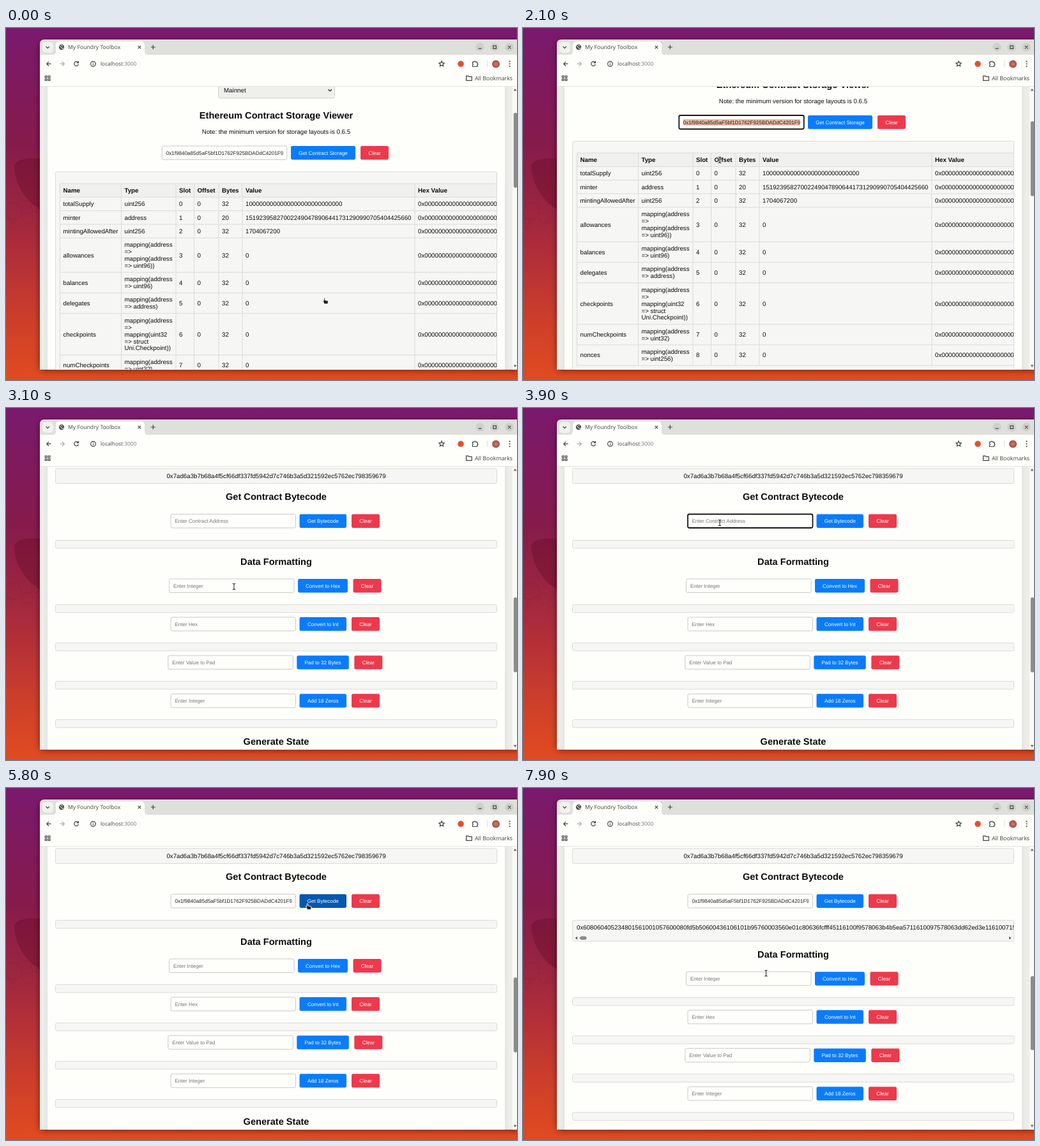
An HTML page that plays this animation: 800x552 px, repeating every 8000 ms.

```html
<!DOCTYPE html>
<html lang="en">
<head>
<meta charset="utf-8">
<title>Contract toolbox</title>
<style>
  html, body { margin: 0; width: 100%; height: 100%; overflow: hidden; background: #841a4f; }
  #stage { display: block; width: 800px; height: 552px; }
  text { font-family: "Liberation Sans", Arial, sans-serif; font-size: 9.73px; fill: #0c0c0c; text-rendering: geometricPrecision; white-space: pre; }
  .title, .head { font-weight: bold; }
  .title { font-size: 14.58px; text-anchor: middle; }
  .mid { text-anchor: middle; }
  .field { font-size: 8.11px; fill: #202020; }
  .hint { fill: #777; }
  .btn { font-size: 8.11px; fill: #fff; text-anchor: middle; }
  .ui { font-family: "Open Sans", "Noto Sans", sans-serif; fill: #40403e; }
  .icon { fill: none; stroke: #444442; stroke-width: 1.2; }
</style>
</head>
<body>
<svg id="stage" viewBox="0 0 800 552" xmlns="http://www.w3.org/2000/svg"></svg>
<script>
const LOOP = 8000, STEP = 100;
const BLUE = '#0a7cfa', BLUE_HOVER = '#0657ae', RED = '#ec3a4c', WHITE = '#fefefb', EDGE = '#dbdbd8';
const ADDRESS = '0x1f9840a85d5aF5bf1D1762F925BDADdC4201F984';
const BYTECODE = '0x608060405234801561001057600080fd5b50600436106101b95760003560e01c80636fcfff45116100f9578063b4b5ea5711610097578063dd62ed3e1161007157';
const LOWER = 599;      // top of the lower sections inside the page
const LINE = 10.944;

const rect = (x, y, w, h, fill, r = 0, more = '') =>
  `<rect x="${x}" y="${y}" width="${w}" height="${h}" fill="${fill}" rx="${r}" ${more}/>`;
const text = (x, y, s, cls = '', more = '') => `<text x="${x}" y="${y}" class="${cls}" ${more}>${s}</text>`;
const path = (d, more = 'class="icon"') => `<path d="${d}" ${more}/>`;
const circle = (x, y, r, more) => `<circle cx="${x}" cy="${y}" r="${r}" ${more}/>`;
const crop = (x, y, w, h, body) =>
  `<svg x="${x}" y="${y}" width="${w}" height="${h}" viewBox="${x} ${y} ${w} ${h}">${body}</svg>`;
const button = (x, y, w, label, fill, id = '') =>
  rect(x, y, w, 21.5, fill, 2.4, id && `id="${id}"`) + text(x + w / 2, y + 13.6, label, 'btn');
const panel = (y, h, id = '') =>
  rect(77.5, y, 691, h, '#f6f6f4', 2.4, `stroke="${EDGE}" ${id && `id="${id}"`}`);

function input(x, y, value, id = '', cls = 'field hint') {
  const tag = name => id && `id="${id}${name}"`;
  return rect(x, y, 195.5, 21.5, WHITE, 2.4, `stroke="#cacac7" ${tag('Box')}`) +
    crop(x + 6, y + 1, 183.5, 19.5,
      rect(x + 6.5, y + 6, 184, 10, '#e9b9a8', 0, `visibility="hidden" ${tag('Mark')}`) +
      text(x + 6.4, y + 13.6, value, cls, tag('Text')));
}

function form(x, y, hint, width, label, clearX, id = '') {
  return input(x, y, hint, id) + button(x + 201.5, y, width, label, BLUE, id && id + 'Btn') +
    button(clearX, y, 44, 'Clear', RED);
}

const scroller = y =>
  path(`M85 ${y - 2.5}v5l-3.5-2.5zM761 ${y - 2.5}v5l3.5-2.5z`, 'fill="#5c5c5a"') +
  rect(89, y - 2.8, 10.5, 5.6, '#8c8c8a', 2.8);

function table() {
  const cols = [84.5, 180.5, 266, 294.5, 333, 370, 640];
  const zeros = '0x' + '0'.repeat(64);
  const rows = [
    ['totalSupply', 'uint256', 32, '1000000000000000000000000000'],
    ['minter', 'address', 20, '151923958270022490478906441731290990705404425660'],
    ['mintingAllowedAfter', 'uint256', 32, '1704067200'],
    ['allowances', 'mapping(address|=>|mapping(address|=> uint96))', 32, 0],
    ['balances', 'mapping(address|=> uint96)', 32, 0],
    ['delegates', 'mapping(address|=> address)', 32, 0],
    ['checkpoints', 'mapping(address|=>|mapping(uint32|=> struct|Uni.Checkpoint))', 32, 0],
    ['numCheckpoints', 'mapping(address|=> uint32)', 32, 0],
    ['nonces', 'mapping(address|=> uint256)', 32, 0],
  ].map(([name, type, bytes, value], slot) => [name, type, slot, 0, bytes, value, zeros]);
  rows.unshift(['Name', 'Type', 'Slot', 'Offset', 'Bytes', 'Value', 'Hex Value']);

  let y = 244, out = rect(84, y, 690, 21.3, '#f0f0ee'), lines = '';
  rows.forEach((row, r) => {
    const height = LINE * row[1].split('|').length + 10.336, middle = y + height / 2 + 3.4;
    lines += `M84 ${y}H775`;
    row.forEach((cell, c) => {
      const parts = String(cell).replaceAll('>', '&gt;').split('|');
      parts.forEach((part, i) => {
        out += text(cols[c] + 5, middle + (i - (parts.length - 1) / 2) * LINE, part, r ? '' : 'head');
      });
    });
    y += height;
  });
  cols.forEach(x => lines += `M${x} 244V${y}`);
  return crop(78, 226, 690, 380, out + path(lines + `M84 ${y}H775`, `fill="none" stroke="${EDGE}"`)) + scroller(598);
}

function page() {
  const upper =
    rect(332.5, 85.5, 182, 24.5, '#efefec', 2.4, 'stroke="#cfcfcc"') +
    text(341, 101.3, 'Mainnet') +
    path('M504.5 96.2l2.7 2.7 2.7-2.7', 'fill="none" stroke="#222" stroke-width="1.3"') +
    text(423, 142, 'Ethereum Contract Storage Viewer', 'title') +
    text(423, 166.2, 'Note: the minimum version for storage layouts is 0.6.5', 'mid') +
    input(244.3, 185, ADDRESS, 'top', 'field') +
    button(446, 185, 101, 'Get Contract Storage', BLUE) + button(555, 185, 44, 'Clear', RED) +
    panel(225.5, 379) + table();
  const forms = [
    [255.5, 'Enter Integer', 78, 'Convert to Hex', 543.5],
    [258, 'Enter Hex', 73.5, 'Convert to Int', 541],
    [253.8, 'Enter Value to Pad', 81.5, 'Pad to 32 Bytes', 545.3],
    [258, 'Enter Integer', 73.5, 'Add 18 Zeros', 541],
  ].map(([x, ...rest], i) => form(x, 268 + 60.1 * i, ...rest) + panel(308.3 + 60.1 * i, 12.5)).join('');
  const lower =
    text(423, 31, 'Get Storage Slot', 'title') + form(258, 53, 'Enter Slot', 73.5, 'Get Slot', 541) +
    panel(94.8, 23.6) +
    text(423, 109.8, '0x7ad6a3b7b68a4f5cf66df337fd5942d7c746b3a5d321592ec5762ec798359679', 'mid') +
    text(423, 144.4, 'Get Contract Bytecode', 'title') +
    form(258, 166.5, 'Enter Contract Address', 73.5, 'Get Bytecode', 541, 'code') +
    panel(207.5, 12.5, 'resultBox') +
    `<g id="result">${crop(78, 208, 690, 32, text(84, 222, BYTECODE))}${scroller(235.2)}</g>` +
    `<g id="formats">${text(423, 245.8, 'Data Formatting', 'title')}${forms}${text(423, 527.8, 'Generate State', 'title')}</g>`;
  return upper + `<g transform="translate(0 ${LOWER})">${lower}</g>`;
}

function wallpaper() {
  const stops = ['#7a1a6f', '#801a5c', '#861b4b', '#992441', '#b43037', '#cd3f2a', '#e04b20'];
  const faint = 'fill="none" stroke="#000" stroke-opacity=".07"';
  return `<defs><linearGradient id="sky" x2="0" y2="1">${stops.map((c, i) =>
      `<stop offset="${i / 6}" stop-color="${c}"/>`).join('')}</linearGradient>
    <radialGradient id="face"><stop offset="0" stop-color="#c98270"/><stop offset="1" stop-color="#a8483f"/></radialGradient>
    <filter id="soft" x="-10%" y="-10%" width="120%" height="120%"><feGaussianBlur stdDeviation="5"/></filter></defs>` +
    rect(0, 0, 800, 552, 'url(#sky)') +
    path('M56 205C30 203 12 207 13 219C15 246 30 272 56 286z', 'fill="#5a0820" opacity=".32"') +
    circle(12, 287, 13, faint) + circle(34, 298, 9, faint) + circle(3, 306, 8, faint) + circle(46, 282, 7, faint);
}

function chrome() {
  const round = 'fill="#cfcfcc"';
  return rect(53, 21, 770, 516, '#000', 7, 'opacity=".5" filter="url(#soft)"') +
    path('M53 535.5V25q0-7 7-7H800V535.5z', 'fill="#dfdfdc"') +
    rect(57, 22, 17, 17, '#f1f1ee', 5) + path('M62.6 29l2.6 2.6 2.6-2.6') +
    path('M73 42q5 0 5-5V27q0-6 6-6H211q6 0 6 6V37q0 5 5 5z', `fill="${WHITE}"`) +
    circle(87, 30, 4.2, 'fill="#4a4a48"') +
    path('M83.8 28.2q2 .2 2.2 1.8t2 1.5M86.5 26.5q.4 1.8 2.6 1.6M88 33q.3-1.6 2.4-1.8', `fill="none" stroke="${WHITE}" stroke-width="1"`) +
    text(97, 33.2, 'My Foundry Toolbox', 'ui', 'style="font-size:8.7px"') +
    path('M206.6 27.8l4.6 4.6m0-4.6l-4.6 4.6M226.8 30h7m-3.5-3.5v7') +
    [742, 765, 788].map(x => circle(x, 30, 6.8, round)).join('') +
    path('M739.5 32.2h5M762.8 27.8h4.6v4.6h-4.6zM785.8 27.8l4.6 4.6m0-4.6l-4.6 4.6') +
    rect(53, 42, 747, 49.5, WHITE) +
    path('M70.5 56.2H63.8m3.2-3.3l-3.3 3.3 3.3 3.3') +
    path('M84.5 56.2H91.2m-3.2-3.3l3.3 3.3-3.3 3.3', 'fill="none" stroke="#aaa" stroke-width="1.2"') +
    path('M113 54.2a3.4 3.4 0 1 0 .4 2.8M113.4 52v2.7h-2.7') +
    circle(136.5, 56.2, 3.9, 'class="icon"') + path('M136.5 55.8v2.5M136.5 53.7v1') +
    text(148, 59.3, 'localhost<tspan fill="#777">:3000</tspan>', 'ui', 'style="font-size:8.35px"') +
    path('M682 51.9l1.25 2.7 2.9.35-2.15 2 .6 2.9-2.6-1.45-2.6 1.45.6-2.9-2.15-2 2.9-.35z') +
    circle(712, 56.3, 4.8, 'fill="#e2502f"') +
    path('M730.4 53.3h2.2a1.3 1.3 0 0 1 2.6 0h2.4v2.4a1.3 1.3 0 0 1 0 2.6v2.2h-7.2v-2.3a1.3 1.3 0 0 0 0-2.5z') +
    path('M753.5 51v10M719.5 73.5v10', 'stroke="#deded9"') +
    circle(767, 56.5, 6, 'fill="url(#face)"') +
    [52.4, 56.2, 60].map(y => circle(788.5, y, 1.05, 'fill="#444442"')).join('') +
    path('M61.3 75h2.7v2.7h-2.7zM66.2 75h2.7v2.7h-2.7zM61.3 79.8h2.7v2.7h-2.7zM66.2 79.8h2.7v2.7h-2.7z') +
    path('M720.8 75.2h3l1 1.2h4.4v6h-8.4z') +
    text(734, 81.7, 'All Bookmarks', 'ui', 'style="font-size:8.85px"') +
    path('M53 91.5H800', 'stroke="#e3e3e0"');
}

const cursors =
  `<g id="beam">${path('M-2.2-4.6q2.2 0 2.2 1.3V3.3q0 1.3-2.2 1.3M2.2-4.6q-2.2 0-2.2 1.3M0 3.3q0 1.3 2.2 1.3', 'fill="none" stroke="#fff" stroke-opacity=".7" stroke-width="2"')}
   ${path('M-2.2-4.6q2.2 0 2.2 1.3V3.3q0 1.3-2.2 1.3M2.2-4.6q-2.2 0-2.2 1.3M0 3.3q0 1.3 2.2 1.3', 'fill="none" stroke="#333" stroke-width="1.1"')}</g>
   <g id="hand">${path('M-2.2-4.6q1.1-.7 1.6.5V-1.2L3.4-.6Q4.5-.3 4.4 1L3.9 4.8H-1.8L-4-.2q.2-1.2 1.5-.1z', 'fill="#222" stroke="#fff" stroke-width=".9" stroke-linejoin="round"')}</g>`;

const stage = document.getElementById('stage');
stage.innerHTML = wallpaper() + chrome() +
  crop(53, 92, 747, 443.5,
    rect(53, 92, 747, 444, '#ededea') +
    rect(65, 80, 716, 480, '#000', 0, 'opacity=".08" filter="url(#soft)"') +
    rect(65, 80, 716, 480, WHITE) +
    `<g id="page">${page()}</g>` +
    rect(793, 92, 7, 444, '#fafaf7') +
    path('M794.5 98.5h5l-2.5-3.5zM794.5 528.5h5l-2.5 3.5z', 'fill="#666"') +
    rect(794.7, 133, 5.6, 117.5, '#8c8c8a', 2.8, 'id="thumb"')) +
  cursors;

const el = id => document.getElementById(id);
const set = (id, attrs) => { for (const k in attrs) el(id).setAttribute(k, attrs[k]); };
const show = (id, on) => set(id, { visibility: on ? 'visible' : 'hidden' });

// Linear interpolation along [time, ...values] keys.
function along(keys, t) {
  const i = keys.findIndex(k => k[0] > t);
  if (i < 0) return keys.at(-1).slice(1);
  if (!i) return keys[0].slice(1);
  const a = keys[i - 1], b = keys[i], p = (t - a[0]) / (b[0] - a[0]);
  return a.slice(1).map((v, n) => v + (b[n + 1] - v) * p);
}

const scrollKeys = [[0, 0], [100, -4], [200, -9], [300, -11.5], [2000, -11.5], [2100, 48], [2200, 250], [2300, 480], [2400, LOWER]];
const pointerKeys = [
  [0, 500, 428], [400, 500, 428], [600, 420, 330], [800, 330, 228], [900, 330, 228], [1100, 308, 207],
  [2700, 308, 207], [2900, 330, 245], [3100, 357, 280], [3300, 345, 240], [3600, 312, 187], [3700, 308, 180],
  [4100, 308, 180], [4300, 450, 179], [4400, 450, 179], [4600, 473.5, 186], [7500, 473.5, 186],
  [7600, 455, 203], [7700, 420, 240], [7800, 392, 276], [7900, 380.5, 290.5],
];

function focus(id, on) {
  set(id + 'Box', { stroke: on ? '#161616' : '#cacac7', 'stroke-width': on ? 1.8 : 1 });
}

function draw(time) {
  const t = Math.floor(time / STEP) * STEP;
  const [scroll] = along(scrollKeys, t), [x, y] = along(pointerKeys, t);
  const pasted = t >= 4000, done = t >= 6100;
  const hovering = t >= 4500 && t < 7600;

  set('page', { transform: `translate(0 ${-scroll})` });
  set('thumb', { y: 133 + scroll / 3.65 - (done ? 2 : 0), height: done ? 116 : 117.5 });

  focus('top', t >= 1200 && t < 3700);
  show('topMark', t >= 1500 && t < 3700);
  focus('code', t >= 3700 && t < 4800);
  el('codeText').textContent = pasted ? ADDRESS : 'Enter Contract Address';
  set('codeText', { class: pasted ? 'field' : 'field hint' });
  set('codeBtn', { fill: hovering ? BLUE_HOVER : BLUE });

  show('result', done);
  set('resultBox', { height: done ? 32.7 : 12.5 });
  set('formats', { transform: `translate(0 ${done ? 20.2 : 0})` });

  const pointing = t < 500 || hovering;
  show('hand', pointing);
  show('beam', !pointing);
  set(pointing ? 'hand' : 'beam', { transform: `translate(${x} ${y})` });
}

const start = performance.now();
function tick() {
  draw((performance.now() - start) % LOOP);
  requestAnimationFrame(tick);
}
draw(0);
requestAnimationFrame(tick);
</script>
</body>
</html>
```
